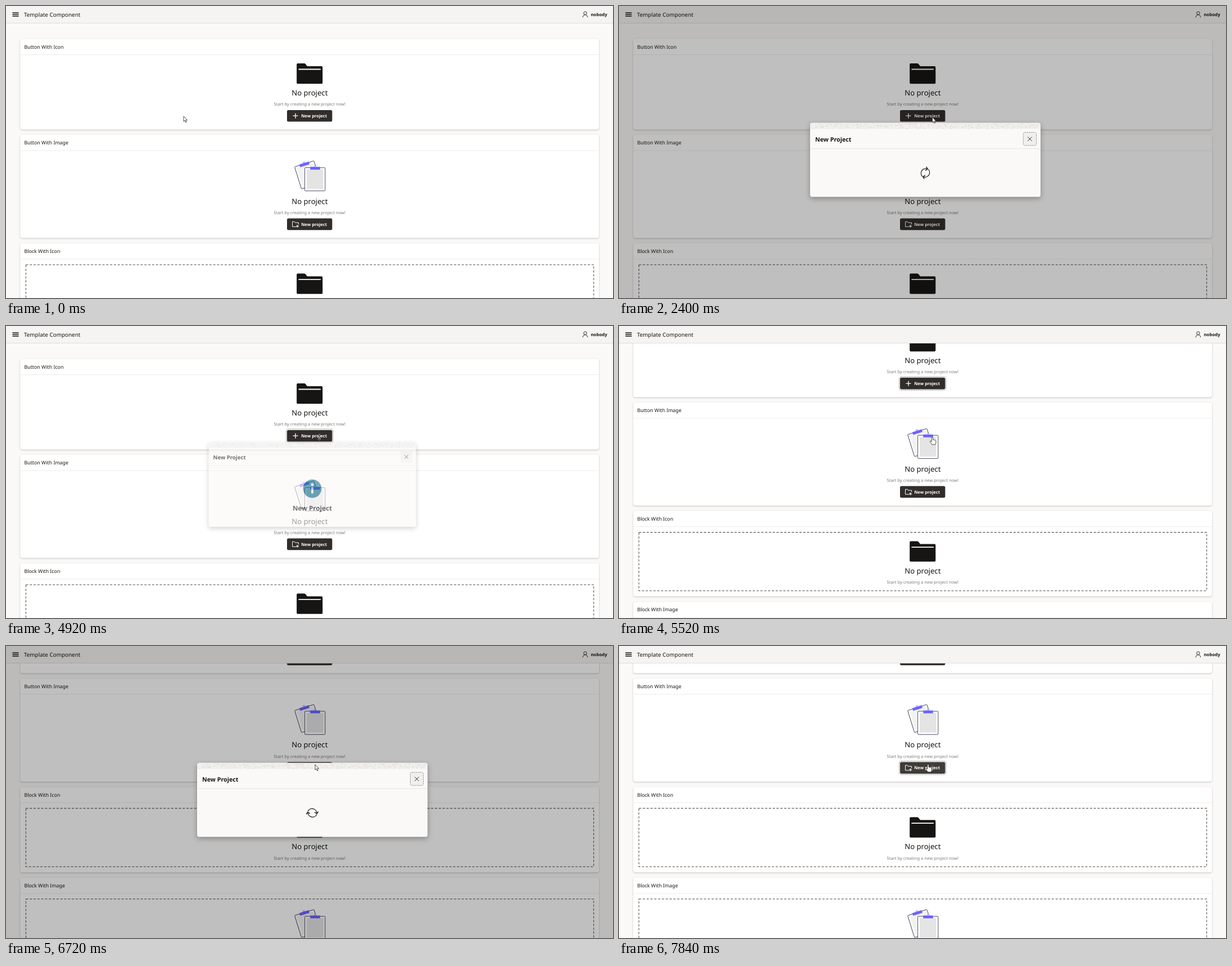
Write an HTML page that moves like this. It is 1080 by 519 pixels and loops after 8 s.

```html
<!DOCTYPE html>
<html lang="en">
<head>
<meta charset="utf-8">
<title>Template Component</title>
<style>
  html, body { margin: 0; width: 100%; height: 100%; overflow: hidden; background: #fbf9f8; }
  svg { display: block; width: 100%; height: 100%; }
  text { font-family: "Noto Sans", "Open Sans", sans-serif; fill: #161513; text-rendering: geometricPrecision; }
  .mid { text-anchor: middle; }
  .line { fill: none; stroke: #161513; }
  .card { fill: #fff; filter: drop-shadow(0 1.4px 1.6px rgba(0, 0, 0, .22)); }
  .panel { fill: #fbf9f8; filter: drop-shadow(0 3px 5px rgba(0, 0, 0, .3)); }
</style>
</head>
<body>
<svg id="stage" viewBox="0 0 1080 519" preserveAspectRatio="none"></svg>
<script>
const LOOP = 8000;
const DARK = '#312d2a';

const text = (x, y, size, weight, str, extra = '') =>
  `<text x="${x}" y="${y}" font-size="${size}" font-weight="${weight}" ${extra}>${str}</text>`;
const rect = (x, y, w, h, fill, extra = '') =>
  `<rect x="${x}" y="${y}" width="${w}" height="${h}" fill="${fill}" ${extra}/>`;
const at = (y, body) => `<g transform="translate(0 ${y})">${body}</g>`;

// ---- page parts ----
const card = (y, h, title) =>
  rect(25.3, y, 1029.7, h, '#fff', 'rx="4" class="card"') +
  rect(25.3, y + 27.6, 1029.7, .8, '#ebe9e7') +
  text(32.5, y + 17.2, 8.8, 500, title);

const folder =
  `<path d="M519 102H530.5Q532 102 533 103.2L536 107H561.5Q563.3 107 563.3 109V136.4Q563.3 138.2 561.5 138.2H519
    Q517.2 138.2 517.2 136.4V104Q517.2 102 519 102Z" fill="#161513"/>` +
  rect(520.3, 111.6, 39.8, 1.9, '#fff', 'rx=".9"');

const clip = (x, y) =>
  `<circle cx="${x + 8.8}" cy="${y - .6}" r="1.5" fill="#fff" stroke="#6c63ff" stroke-width=".8"/>` +
  rect(x, y, 17.6, 5, '#6c63ff');

const sheet = (w, h, tone) =>
  rect(0, 0, w, h, '#fff', 'rx="1" stroke="#3f3d56" stroke-width=".9"') +
  rect(3.4, 3.2, w - 6.6, h - 6.8, tone);

const papers =
  `<g transform="translate(513.5 286) rotate(-17.4)">${sheet(36, 41, '#f2f2f2')}${clip(9.2, -1.6)}</g>` +
  `<g transform="translate(531.6 287.3)">${sheet(36.2, 41.3, '#e4e4e4')}${clip(9.6, -1.4)}</g>`;

const caption = y =>
  text(540.3, y, 13.1, 400, 'No project', 'class="mid"') +
  text(540.3, y + 18.3, 7.6, 400, 'Start by creating a new project now!', 'class="mid" style="fill:#7f7d7b"');

const button = (id, y, icon) =>
  `<rect id="${id}Ring" x="498.6" y="${y - 1.7}" width="83.2" height="24" rx="3" fill="none"
    stroke="#56604f" stroke-width=".9" stroke-dasharray="1.4 1.2"/>` +
  `<rect id="${id}" x="500" y="${y}" width="80.4" height="20.6" rx="2.6"/>` +
  `<g transform="translate(515 ${y + 10.3})" fill="none" stroke="#fff">${icon}</g>` +
  text(525.2, y + 13.1, 7.6, 700, 'New project', 'style="fill:#fff"');

const plus = '<path d="M-4.5 0H4.5M0 -4.5V4.5" stroke-width="1.3"/>';
const newFolder =
  `<path d="M1.2 4.4H-5.4V-4.6H-2L-.6 -2.8H5.6V.2" stroke-width="1"/>
   <path d="M3.6 .8V6M1 3.4H6.2M1.8 1.6L5.4 5.2M5.4 1.6L1.8 5.2" stroke-width=".8"/>`;

const dashed = (y, h) =>
  rect(35.4, y, 1010.2, h, 'none', 'stroke="#716f6d" stroke-width="1.3" stroke-dasharray="4.1 2.7"');

const page =
  card(58.5, 161, 'Button With Icon') + folder + caption(159) + button('first', 184.9, plus) +
  card(229, 183.2, 'Button With Image') + papers + caption(351.8) + button('second', 377.6, newFolder) +
  card(421.8, 151.8, 'Block With Icon') + dashed(459.8, 103.8) + at(373.6, folder) + caption(532.8) +
  card(583.2, 174, 'Block With Image') + dashed(621, 126) + at(364.4, papers) + caption(716.2);

const header =
  rect(0, 0, 1080, 30.2, '#f5f4f2') + rect(0, 30, 1080, .9, '#dfdddb') +
  '<path class="line" d="M11.4 12H22.6M11.4 15H22.6M11.4 18H22.6" stroke-width="1.4"/>' +
  text(32, 18.8, 9.9, 500, 'Template Component') +
  '<g class="line" stroke-width=".9"><circle cx="1030.5" cy="12.7" r="2.7"/>' +
  '<path d="M1026.2 20.2Q1026.6 15.8 1030.5 15.8T1034.8 20.2"/></g>' +
  text(1040.5, 17.9, 7.8, 600, 'nobody');

// ---- dialog, drawn from its top edge ----
function weave() {
  let seed = 7, d = '';
  const rnd = () => (seed = seed * 16807 % 2147483647) / 2147483647;
  for (let i = 0; i < 620; i++) {
    const x = 341 + rnd() * 405, y = 1 + rnd() * 9;
    d += `M${x.toFixed(1)} ${y.toFixed(1)}l${(rnd() * 3).toFixed(1)} ${(rnd() * 2 - 1).toFixed(1)}`;
  }
  return `<path d="${d}" fill="none" stroke="#d9d6d2" stroke-width=".7"/>`;
}

const halfSpin = '<path d="M-8 -2.6A8.4 8.4 0 0 1 8 1M4 -1.4L8 1.4L10.8 -2.4"/>';

const dialog =
  '<rect id="panel" class="panel" x="340" y="0" width="410" rx="4"/>' +
  '<path d="M340 11V4Q340 0 344 0H746Q750 0 750 4V11Z" fill="#f3f1ef"/>' + weave() +
  text(349, 33, 10.7, 700, 'New Project') +
  rect(340, 45.4, 410, .9, '#e6e3e0') +
  rect(719.3, 16.7, 23.4, 23.4, '#f1efed', 'rx="3"') +
  rect(719.3, 16.7, 23.4, 23.4, 'none', 'id="closeRing" rx="3" stroke="#5d6a58" stroke-width=".8" stroke-dasharray="2 1.4"') +
  '<path class="line" d="M727.2 24.8L734.6 32.2M734.6 24.8L727.2 32.2" stroke-width=".9"/>' +
  `<g id="spinner" class="line" stroke-width="1.3">${halfSpin}<g transform="rotate(180)">${halfSpin}</g></g>` +
  '<g id="done"><circle cx="545" cy="91.3" r="18.2" fill="#1a7391"/>' +
  '<circle cx="545" cy="83.4" r="2.5" fill="#fff"/>' + rect(542.9, 88.4, 4.2, 12.4, '#fff', 'rx="1"') +
  text(545, 134.4, 12.9, 700, 'New Project', 'class="mid"') + '</g>';

// ---- pointers, tip at the origin ----
const pointers = `
  <path id="arrow" d="M0 0V9.2L2.2 7.3L3.7 10.8L5.2 10.1L3.8 6.8H6.6Z" fill="#fff" stroke="#222" stroke-width=".8"/>
  <path id="hand" d="M-1.2 6.4V.6Q-1.2 -.6 0 -.6T1.2 .6V4.2L4.2 4.8Q6.4 5.2 6.4 7V9.6Q6 11.4 5.2 13H-.6
    Q-1.6 11 -3.8 8.6Q-4.8 7 -3.6 6.6Q-2.4 6.4 -1.2 8Z" fill="#fff" stroke="#222" stroke-width=".8"/>
  <path id="resize" d="M0 -5.4L2.6 -2.4H.7V2.4H2.6L0 5.4L-2.6 2.4H-.7V-2.4H-2.6Z" fill="#222" stroke="#fff" stroke-width=".5"/>`;

document.getElementById('stage').innerHTML =
  rect(0, 0, 1080, 519, '#fbf9f8') + `<g id="page">${page}</g>` + header +
  rect(0, 0, 1080, 519, '#000', 'id="shade" opacity=".25"') +
  `<g id="dialog">${dialog}</g><g id="pointer">${pointers}</g>`;

// ---- motion ----
const $ = id => document.getElementById(id);
const set = (id, name, value) => $(id).setAttribute(name, value);
const show = (id, on) => set(id, 'visibility', on ? 'inherit' : 'hidden');
const ramp = (t, a, b) => Math.min(1, Math.max(0, (t - a) / (b - a)));
const ease = p => (1 - Math.cos(Math.PI * p)) / 2;
const within = (t, a, b) => t >= a && t < b;

// Smooth curve through [time, x, y] points, held at both ends.
function along(pts, t) {
  const last = pts.length - 1;
  if (t <= pts[0][0]) return pts[0].slice(1);
  if (t >= pts[last][0]) return pts[last].slice(1);
  const i = pts.findIndex(p => p[0] > t) - 1;
  const a = pts[Math.max(0, i - 1)], b = pts[i], c = pts[i + 1], d = pts[Math.min(last, i + 2)];
  const u = ramp(t, b[0], c[0]);
  return [1, 2].map(k => b[k] + u / 2 * (c[k] - a[k] +
    u * (2 * a[k] - 5 * b[k] + 4 * c[k] - d[k] + u * (3 * (b[k] - c[k]) + d[k] - a[k]))));
}

const sweep = [[40, 316, 196], [160, 292, 216], [280, 335, 310], [420, 550, 328],
  [540, 672, 235], [640, 610, 150], [720, 540, 122]];
const circle = [[960, 540, 122], [1080, 506, 112], [1200, 530, 93], [1340, 564, 108],
  [1460, 545, 146], [1600, 512, 160], [1720, 545, 185], [1800, 557.5, 197.8]];
const settle = [[5760, 557.5, 197.8], [5920, 550, 211]];

// Each visit: opening, growth, closing, and the spinner's turn at a given time.
const visits = [
  { open: 2200, grow: 4200, close: 4920, turn: t => 60 + (t - 3600) / 1400 * 360 },
  { open: 6280, grow: 7200, close: 7640, turn: t => (t - 6720) / 1400 * 360 }
];

function drawDialog(t) {
  const v = visits.find(v => within(t, v.open, v.close + 160));
  show('dialog', !!v);
  show('shade', !!v && t < v.close);
  if (!v) return;
  const grown = t >= v.grow;
  const top = grown ? 190.2 : 207.8, height = grown ? 166.8 : 131.4, bottom = top + height;
  const away = t < v.close
    ? .6 * (1 - ramp(t, v.open - 40, v.open + 160)) ** 2
    : .4 + .6 * ramp(t, v.close + 40, v.close + 160);
  const scale = 1 - .25 * away;
  set('dialog', 'opacity', 1 - away);
  set('dialog', 'transform',
    `translate(545 ${bottom}) scale(${scale}) translate(-545 ${-height})`);
  set('panel', 'height', height);
  show('spinner', !grown);
  set('spinner', 'transform', `translate(545 88.8) rotate(${v.turn(t)})`);
  show('done', t >= v.grow + 40);
  show('closeRing', t < v.close);
}

function drawPointer(t) {
  const [x, y] = along(t < 960 ? sweep : t < 5000 ? circle : settle, t);
  set('pointer', 'transform', `translate(${x} ${y})`);
  const hand = within(t, 1840, 2080) || within(t, 5080, 5600) || within(t, 5880, 6200) || t >= 7800;
  const resize = within(t, 4200, 5080);
  show('hand', hand);
  show('resize', resize);
  show('arrow', !hand && !resize);
}

function draw(t) {
  const scroll = 57.1 * (ease(ramp(t, 5240, 5408)) + ease(ramp(t, 5408, 5600)) + ease(ramp(t, 5760, 5920)));
  set('page', 'transform', `translate(0 ${-scroll})`);
  show('firstRing', within(t, 2040, 2200) || within(t, 4920, 6120));
  show('secondRing', within(t, 6120, 6280) || t >= 7640);
  set('first', 'fill', within(t, 1760, 2200) ? '#403c38' : DARK);
  set('second', 'fill', within(t, 5880, 6280) || t >= 7800 ? '#403c38' : DARK);
  drawDialog(t);
  drawPointer(t);
}

const start = performance.now();
function tick() {
  const t = (performance.now() - start) % LOOP;
  draw(Math.floor((t + 1) / 40) * 40 % LOOP);
  requestAnimationFrame(tick);
}
tick();
</script>
</body>
</html>
```
